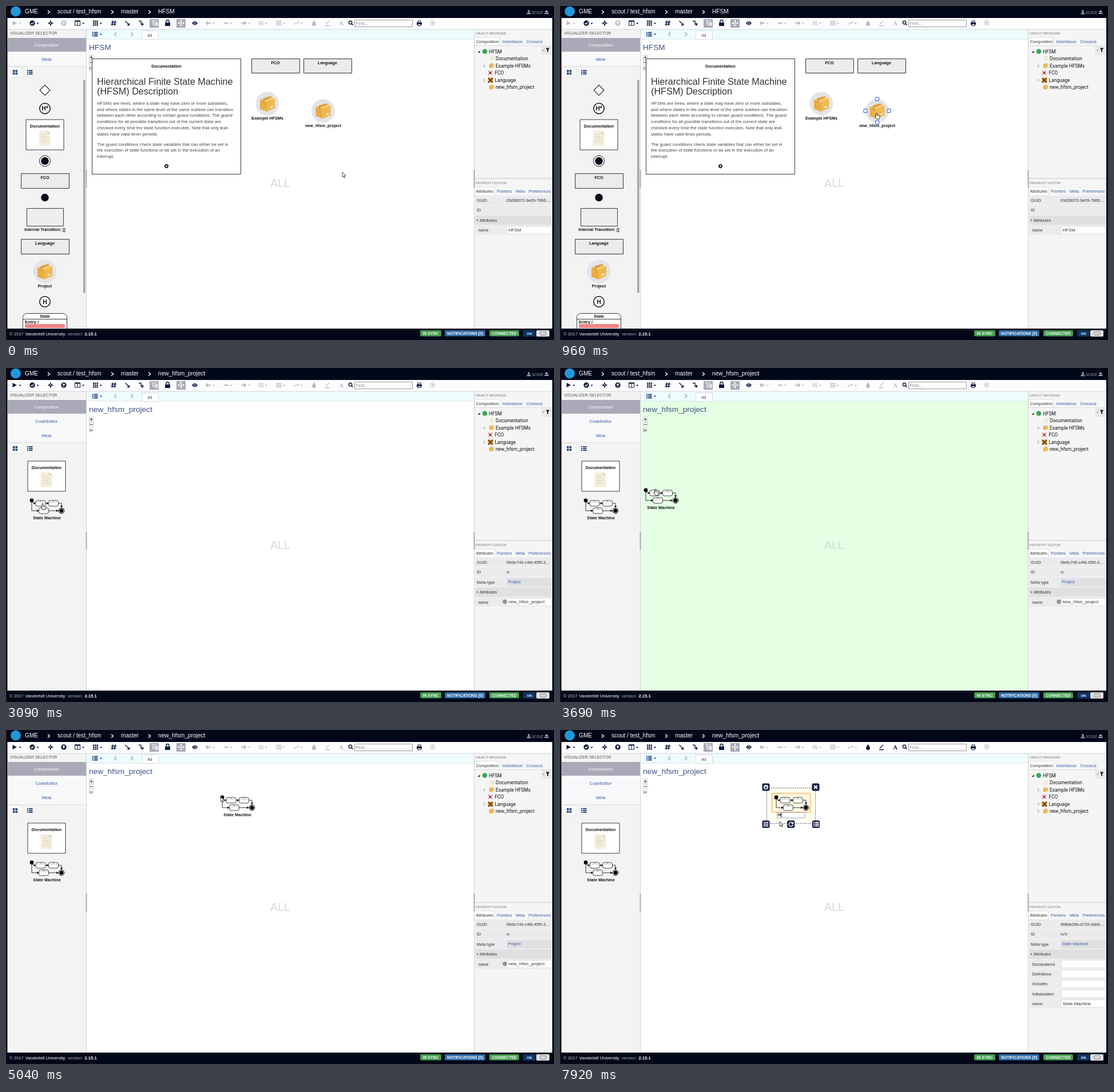
These frames come from a looping animation (958 by 585 pixels, 8000 ms). An HTML page with a canvas:

```html
<!DOCTYPE html>
<html lang="en">
<head>
<meta charset="utf-8">
<title>Model editor</title>
<style>
html, body { margin: 0; width: 100%; height: 100%; overflow: hidden; background: #fff; }
canvas { display: block; }
</style>
</head>
<body>
<canvas id="stage" width="958" height="585"></canvas>
<script>
const g = document.getElementById('stage').getContext('2d');
const LOOP = 8000;
const OPEN = 1500, HEADER = 2460, DRAG = 3350, DROP = 4900, SELECT = 5520, EDIT = 5600,
      CARET = 6600, MARK = 6990, TYPED = 7830;
const NAVY = '#0c1a3c', BLUE = '#3a5ca0', DARK = '#020818', GREY = '#b9bcc2', INK = '#333', EDGE = '#3a3a3a';
const FONT = '"Liberation Sans", Arial, sans-serif';
const TREE_FONT = 'Roboto, "Liberation Sans", sans-serif';

// ---- drawing helpers ----
function text(s, x, y, size = 7.2, color = INK, style = '', align = 'left', font = FONT) {
  g.font = `${style} ${size}px ${font}`;
  g.fillStyle = color;
  g.textAlign = align;
  g.fillText(s, x, y);
  return g.measureText(s).width;
}
const label = (s, x, y, size = 7.2) => text(s, x, y, size, '#111', 'bold', 'center');

function paint(path, fill, stroke, width = 1) {
  if (fill) { g.fillStyle = fill; g.fill(path); }
  if (stroke) { g.strokeStyle = stroke; g.lineWidth = width; g.stroke(path); }
}
function rect(x, y, w, h, fill, stroke, radius = 0, width = 1) {
  const p = new Path2D();
  p.roundRect(x, y, w, h, radius);
  paint(p, fill, stroke, width);
}
function disc(x, y, r, fill, stroke, width) {
  const p = new Path2D();
  p.arc(x, y, r, 0, 7);
  paint(p, fill, stroke, width);
}
function shape(d, x, y, fill, stroke, width) {
  g.save();
  g.translate(x, y);
  paint(new Path2D(d), fill, stroke, width);
  g.restore();
}
const caretDown = (x, y, c) => shape('M-2.2-1h4.4L0 1.6z', x, y, c);

function gridIcon(x, y, n, cell, step, color) {
  const o = ((n - 1) * step + cell) / 2;
  for (let i = 0; i < n * n; i++)
    rect(x - o + i % n * step, y - o + (i / n | 0) * step, cell, cell, color);
}
function listIcon(x, y, color) {
  for (let i = -1; i < 2; i++) {
    rect(x - 4.5, y + i * 3 - 1, 2, 2, color);
    rect(x - 1.5, y + i * 3 - 1, 6.5, 2, color);
  }
}

// ---- model parts ----
function classBox(name, x, y, w, h) {
  rect(x + .5, y + .5, w, h, '#ececee', EDGE);
  rect(x + 2, y + 2, w - 3, h - 3, null, '#dcdce0');
  label(name, x + w / 2, y + 10);
}
function page(x, y, k = 1) {
  g.save();
  g.translate(x, y);
  g.scale(k, k);
  shape('M-10-13H5L10-8V13H-10z', 0, 0, '#f3eddc');
  shape('M5-13V-8H10z', 0, 0, '#d6ccb2');
  shape('M-6-6H2M-6-2H6M-6 2H4M-6 6H6', 0, 0, null, '#d5cbb0', .8);
  g.restore();
}
function docCard(x, y) {
  rect(x + .5, y + .5, 66, 53, '#fff', EDGE);
  label('Documentation', x + 33.5, y + 14.5);
  page(x + 33, y + 33);
}
function parcel(x, y, k = 1) {
  g.save();
  g.translate(x, y);
  g.scale(k, k);
  shape('M-13-7 2-13 13-9-1-3z', 0, 0, '#f3c974');
  shape('M-13-7-1-3V14L-13 9z', 0, 0, '#e9ad42');
  shape('M-1-3 13-9V8L-1 14z', 0, 0, '#efb950');
  shape('M-7.5-9 6-13 8-11.5-5-6V-2L-7.5-3z', 0, 0, '#d9983a');
  shape('M5 8 10 6V3.5L5 5.5z', 0, 0, '#fbeccb');
  g.restore();
}
function project(name, x, y) {
  disc(x, y, 20.5, '#e2e4e9');
  parcel(x, y);
  label(name, x, y + 28);
}
function stateMachine(x, y, name) {
  shape('M0 0V18H12M0 0 3 5H6M24 5H29M47 5H52V12M30 18H46', x, y, null, '#222', .9);
  shape('M9 16 13 18 9 20zM4 3 7 5 4 7zM26 3 30 5 26 7zM50 9 52 13 54 9zM43 16 47 18 43 20z', x, y, '#111');
  for (const [dx, dy] of [[15.5, 5], [38, 5], [21, 18]]) {
    rect(x + dx - 8.5, y + dy - 5, 17, 10, '#fff', '#333', 3, .9);
    shape('M-7-2H7', x + dx, y + dy, null, '#999', .6);
    rect(x + dx - 1, y + dy - 4.5, 2, 1, '#555');
  }
  disc(x, y, 3.4, '#000');
  disc(x + 52, y + 18, 4.8, '#fff', '#000', 1);
  disc(x + 52, y + 18, 3.4, '#000');
  if (name) label(name, x + 26.5, y + 33);
}

// ---- fixed frame of the application ----
function topBar(t) {
  rect(0, 0, 958, 21, DARK);
  disc(17, 9.5, 9, '#2196d8');
  const crumbs = [['GME', 33], ['scout / test_hfsm', 90], ['master', 201],
    [t < HEADER ? 'HFSM' : 'new_hfsm_project', 266]];
  for (const [s, x] of crumbs) text(s, x, 13.3, 10.15, '#fff');
  for (const x of [75, 186, 251]) shape('M-2-3 1.5 0-2 3', x, 10.5, null, '#fff', 1.4);
  disc(914, 9, 2, '#8b8f98');
  shape('M-3.5 5.5V4Q-3 2 0 2T3.5 4V5.5z', 914, 9, '#8b8f98');
  text('scout', 919, 13.8, 8.2, '#8b8f98');
  shape('M-3.5 1 0-3 3.5 1zM-3.5 2H3.5V4H-3.5z', 945, 10, '#aab');
}

function toolbar(t) {
  const y = 30, on = t < OPEN ? GREY : NAVY, style = t < SELECT ? GREY : NAVY;
  rect(3, 21, 952, 20, '#fdfdfe');
  shape('M-3.5-4 4 0-3.5 4z', 15, y, on);
  disc(46, y, 4.7, NAVY);
  shape('M-2.3 0-.6 1.8 2.5-1.6', 46, y, null, '#fff', 1.4);
  shape('M0-5.5 1.5-1.5 5.5 0 1.5 1.5 0 5.5-1.5 1.5-5.5 0-1.5-1.5z', 78, y, NAVY);
  disc(78, y, 1, '#fff');
  disc(101, y, 4.7, on);
  shape('M0 3V-2M-2 0 0-2.4 2 0', 101, y, null, '#fff', 1.3);
  rect(120.5, 26, 9, 8, '#fff', NAVY);
  rect(120, 25.5, 10, 2, NAVY);
  rect(124.5, 26, 1, 8, NAVY);
  gridIcon(156.5, y, 3, 2.4, 3.3, NAVY);
  shape('M-1-4.5-2.5 4.5M3-4.5 1.5 4.5M-4-1.7H5M-4.6 1.7H4.4', 188, y, null, NAVY, 1.5);
  shape('M-3.5-4 3 3M3.5 0V3.5H0', 212, y, null, NAVY, 1.3);
  shape('M-4-3.5H0V2H3M1.5-.5 4 2 1.5 4.5', 236, y, null, NAVY, 1.3);
  rect(251, 23, 16, 15, '#a9a9b7');
  shape('M-5-4H5M-2-4V3H3M-2 0H3M3-1.5H6V1H3zM3 2H6V4.5H3z', 259, y, null, '#fff', 1.1);
  rect(278, 29, 9, 6, NAVY, null, 1);
  shape('M-2.5 0V-2A2.5 2.5 0 0 1 2.5-2V0', 282.5, 29, null, NAVY, 1.4);
  rect(298, 23, 16, 15, '#a9a9b7');
  shape('M-5 0H5M0-5V5M-1.5-3.5 0-5 1.5-3.5M-1.5 3.5 0 5 1.5 3.5M-3.5-1.5-5 0-3.5 1.5M3.5-1.5 5 0 3.5 1.5', 306, y, null, '#fff', 1.2);
  shape('M-5 0Q0-7 5 0Q0 7-5 0z', 330, y, NAVY);
  disc(330, y, 2, NAVY, '#fff', .8);
  shape('M4 0H-4M-1-3-4 0-1 3', 354, y, null, GREY, 2);
  rect(381, 29, 8, 2, GREY);
  shape('M-4 0H4M1-3 4 0 1 3', 415, y, null, GREY, 2);
  shape('M-3-4V4M0-4V4M3-4V4M-4.3 1H-1.7M-1.3-2H1.3M1.7 2H4.3', 446, y, null, GREY, 1);
  shape('M-5-3H5M-5 0H5M-5 3H5', 477, y, null, GREY, 1.5);
  shape('M-4 3Q-3-1 0 0T4-3', 508, y, null, GREY, 1.3);
  shape('M0-5Q3.5 0 3.5 1.5A3.5 3.5 0 0 1-3.5 1.5Q-3.5 0 0-5z', 538.5, y, style);
  shape('M-3 2 3-4M-4 4.5H4', 562, y, null, style, 1.3);
  text('A', 586, 34, 11, style, 'bold', 'center', '"Liberation Serif", Times, serif');
  for (const [x, c] of [[24.5, on], [55.5, NAVY], [135, NAVY], [166, NAVY], [363, GREY], [394, GREY],
    [425, GREY], [455, GREY], [486, GREY], [517, GREY]]) caretDown(x, y + .5, c);
  disc(602, 29, 2.7, null, NAVY, 1.4);
  shape('M2 2 4.5 4.5', 602, 29, null, NAVY, 1.6);
  rect(609.5, 24.5, 101, 12, '#fff', '#999');
  text('Find...', 611, 33, 8, '#888');
  rect(718, 28.5, 9, 4.5, NAVY, null, 1);
  rect(720, 26, 5, 3, '#fff', NAVY);
  rect(720, 31.5, 5, 3, '#fff', NAVY);
  disc(746, 29.5, 4, null, GREY, 1);
  shape('M-1.7-1.7 1.7 1.7M1.7-1.7-1.7 1.7', 746, 29.5, null, GREY, 1.2);
}

function footer() {
  rect(0, 565, 958, 20, DARK);
  text('© 2017', 6, 577, 7.6, '#c4c7ce');
  text('Vanderbilt University', 33.5, 577, 7.7, '#fff');
  text('version:', 108, 577, 7.5, '#a8acb6');
  text('2.15.1', 137.5, 577, 7.6, '#fff', 'bold');
  for (const [s, x, w, c] of [['IN SYNC', 724, 37, '#449d50'], ['NOTIFICATIONS [0]', 767, 71, '#2d6ca8'],
    ['CONNECTED', 845, 52, '#449d50']]) {
    rect(x, 568, w, 10.5, c, null, 2);
    text(s, x + w / 2, 575.6, 6.85, '#fff', 'bold', 'center');
  }
  rect(904, 568, 22, 11, '#0d3564', null, 2);
  text('ON', 915, 576, 6, '#fff', 'bold', 'center');
  rect(927, 568, 23, 11, '#dfe1e5', null, 2);
  rect(934, 570.5, 10, 6, '#fff', '#777', 1);
  shape('M-4-1H4M-4 1H4', 939, 573.5, null, '#999', .8);
}

function sidebar(t) {
  rect(3, 41, 137, 524, '#f3f3f4');
  text('VISUALIZER SELECTOR', 7, 50, 7.2, '#555');
  rect(3, 56, 137, 24, '#a9a9b7');
  text('Composition', 71, 70.7, 7.75, '#fff', '', 'center');
  const rows = t < OPEN ? ['Meta'] : ['CodeEditor', 'Meta'];
  const y = 91 + rows.length * 25;
  rect(3, 80, 137, y - 91, '#f8f8fa');
  rows.forEach((s, i) => text(s, 71, 96 + i * 25, 7.75, BLUE, '', 'center'));
  rect(3, y - 11, 137, 1, '#e2e2e6');
  rect(3, y - 9, 25, 18, '#fafafa', '#e4e4e8');
  gridIcon(16, y, 2, 3.6, 4.6, '#24457f');
  listIcon(41.5, y, '#24457f');

  if (t >= OPEN) {
    docCard(37.5, 162.5);
    stateMachine(45, 232, 'State Machine');
    return;
  }
  g.save();
  g.beginPath();
  g.rect(3, 41, 137, 524);
  g.clip();
  shape('M0-9 9 0 0 9-9 0z', 68, 147.5, '#fff', '#222', 1.1);
  for (const [s, cy] of [['H*', 179.5], ['H', 518]]) {
    disc(68, cy, 9.2, '#fff', '#111', 1.5);
    label(s, 68, cy + 3.8, 10.5);
  }
  docCard(34.5, 198.5);
  disc(68, 271.5, 9.5, '#fff', '#111', 1);
  disc(68, 271.5, 6.8, DARK);
  classBox('FCO', 26, 293, 84, 26);
  disc(68, 335.5, 6.7, DARK);
  rect(36.5, 354.5, 64, 31, '#eee', EDGE);
  label('Internal Transition: []', 68, 394);
  classBox('Language', 26, 408, 84, 26);
  project('Project', 68, 465);
  rect(29.5, 538.5, 77, 40, '#fff', EDGE, 7);
  label('State', 68, 546);
  rect(30, 548, 77, 1, EDGE);
  text('Entry /', 33, 556, 7.8, '#111', 'bold');
  rect(33, 557, 70, 7, '#f28585', null, 2.5);
  g.restore();
  rect(135, 129, 3.5, 374, '#a6a6aa', null, 2);
}

function browser(t) {
  rect(819, 41, 136, 524, '#f5f5f6');
  text('OBJECT BROWSER', 821, 49.5, 5.7, '#777');
  rect(819, 55, 44, 14, '#fff', '#ddd');
  rect(819, 69, 136, 1, '#ddd');
  text('Composition', 821.5, 64.7);
  text('Inheritance', 867.5, 64.7, 7.2, BLUE);
  text('Crosscut', 909.5, 64.7, 7.2, BLUE);
  rect(936.5, 71.5, 20, 13, '#ececef', '#ddd');
  shape('M1-2-1 0 1 2', 940, 77.5, null, '#555', .9);
  shape('M-3.5-3.5H3.5L1 0V4L-1 3V0z', 947, 77, '#222');

  shape('M2-2V2H-2z', 826.5, 80, '#333');
  disc(837, 79.5, 4.3, '#36a852');
  page(849.5, 92, .33);
  parcel(849, 104.5, .32);
  parcel(849, 142, .32);
  rect(842.5, 113, 8, 8, '#f8e2e2');
  shape('M-3.5-3.5 3.5 3.5M3.5-3.5-3.5 3.5', 846.5, 117, null, '#d4727c', 1.1);
  disc(846.5, 117, 1.8, '#9c2030');
  rect(842.5, 125.5, 9, 9, '#e2a03c');
  shape('M-4-4 4 4M4-4-4 4', 847, 130, null, '#3a2a18', 1.5);
  const open = t < SELECT ? [105, 130] : [105, 130, 142.5];
  for (const y of open) shape('M-1.5-2.5 1.5 0-1.5 2.5z', 837, y, '#fff', '#aaa', .8);
  [['HFSM', 844], ['Documentation', 856], ['Example HFSMs', 856], ['FCO', 854.5], ['Language', 854.5],
    ['new_hfsm_project', 856]].forEach(([s, x], i) =>
    text(s, x, 82.9 + i * 12.5, 8.35, '#111', '', 'left', TREE_FONT));
}

function properties(t) {
  rect(819, 301, 136, 2, '#ddd');
  text('PROPERTY EDITOR', 821, 312, 5.7, '#777');
  rect(819, 317, 35, 15, '#fff', '#ddd');
  rect(819, 332, 136, 1, '#ddd');
  [['Attributes', 821.5], ['Pointers', 858], ['Meta', 891], ['Preferences', 913.5]]
    .forEach(([s, x], i) => text(s, x, 326.7, 7.2, i ? BLUE : INK));

  const sel = t >= SELECT, node = t >= OPEN;
  const head = [['GUID', sel ? '968de39b-d720-0ab6-...' : node ? '0fe6c740-c4fd-45f0-3...' : '03d36072-9e09-7866-...'],
    ['ID', sel ? '/v/V' : node ? '/v' : '']];
  if (node) head.push(['Meta type', sel ? 'State Machine' : 'Project']);
  const attrs = sel ? ['Declarations', 'Definitions', 'Includes', 'Initialization', 'name'] : ['name'];
  let y = 332;
  for (const [k, v] of head) {
    const link = k === 'Meta type';
    rect(820, y, 134, 16.3, '#ebebed');
    if (link) rect(875.5, y + 1, 78.5, 15, '#e0e0e3');
    text(k, 823, y + 11);
    text(v, link ? 877.5 : 875, y + (link ? 10.5 : 11), 7.2, link ? BLUE : INK);
    y += 17.35;
  }
  rect(820, y, 134, 16.8, '#e0e0e2');
  shape('M-1.7-.8H1.7L0 1.2z', 824, y + 8.5, INK);
  text('Attributes', 828, y + 11);
  for (const k of attrs) {
    y += 17.35;
    rect(820, y, 134, 16.5, '#ebebed');
    rect(876.5, y + 2, 77, 13, '#fff', '#e4e4e6');
    text(k, 825.5, y + 11.2);
    if (k !== 'name') continue;
    text(sel ? 'State Machine' : node ? 'new_hfsm_project' : 'HFSM', 878.5, y + 10.8, 7.75);
    if (node && !sel) {
      disc(872, y + 8, 3, null, '#222', .9);
      shape('M-1.3-1.3 1.3 1.3M1.3-1.3-1.3 1.3', 872, y + 8, null, '#222', 1);
    }
  }
}

// ---- canvas in the middle ----
function description() {
  rect(150.5, 92.5, 260, 202, '#fff', EDGE);
  label('Documentation', 280.5, 108);
  text('Hierarchical Finite State Machine', 159, 137.5, 16.2);
  text('(HFSM) Description', 159, 155, 16.2);
  const lines = ['HFSMs are trees, where a state may have zero or more substates,',
    'and where states in the same level of the same subtree can transition',
    'between each other according to certain *guard conditions*. The *guard',
    '*conditions* for all possible transitions out of the current state are',
    'checked every time the state function executes. Note that only leaf-',
    'states have valid timer periods.',
    'The guard conditions check state variables that can either be set in',
    'the execution of state functions or be set in the execution of an',
    'interrupt.'];
  lines.forEach((line, i) => {
    let x = 159;
    line.split('*').forEach((s, j) => {
      x += text(s, x, 172.8 + i * 10.8 + (i > 5 ? 7 : 0), 7.75, '#444', j % 2 ? 'italic' : '');
    });
  });
  disc(280.5, 280.5, 2.2, null, '#111', 1.5);
  for (let a = 0; a < 8; a++) {
    const c = Math.cos(a * Math.PI / 4), s = Math.sin(a * Math.PI / 4);
    shape(`M${2.2 * c} ${2.2 * s}L${3.9 * c} ${3.9 * s}`, 280.5, 280.5, null, '#111', 1.3);
  }
}

function selection() {
  rect(361.5, 101.5, 85, 62, '#fffff0');
  g.setLineDash([2, 1.5]);
  rect(361.5, 101.5, 85, 62, null, '#667');
  g.setLineDash([]);
  rect(370.5, 111, 67, 33, '#fff9e6', '#fbe3b5', 2, 3);
  rect(370.5, 111, 67, 33, null, '#f3c57c', 2, 1);
  const icons = [[360, 100], [447, 100], [360, 165], [403.7, 165], [447.5, 165]];
  for (const [x, y] of icons) rect(x - 6.5, y - 6.5, 13, 13, NAVY, null, 2.5);
  disc(360, 100, 4, '#fff');
  shape('M0-2.5V2M-2 0 0 2.3 2 0', 360, 100, null, NAVY, 1.2);
  shape('M-3-3 3 3M3-3-3 3', 447, 100, null, '#fff', 2);
  gridIcon(360, 165, 3, 2.2, 3, '#fff');
  shape('M3-2A3.6 3.6 0 1 0 3.6 1M3.8-4V-1H.8', 403.7, 165, null, '#fff', 1.4);
  listIcon(447.5, 165, '#fff');
}

function nameField(t) {
  const marked = t >= MARK && t < TYPED;
  rect(379.5, 144.5, 48.5, 9.5, '#fff', '#9aa4c4');
  g.save();
  g.beginPath();
  g.rect(380, 145, 47.5, 9);
  g.clip();
  if (marked) rect(381, 145.5, 47, 8, '#3390ff');
  text(t < TYPED ? 'State Machine' : 'H', 381, 151.3, 7.2, marked ? '#fff' : '#111', 'bold');
  if (t >= CARET && t < MARK) rect(381, 145, 1, 8, '#111');
  if (t >= TYPED) rect(386.3, 145, 1, 8, '#111');
  g.restore();
}

function workspace(t) {
  const dragging = t >= DRAG && t < DROP;
  rect(141, 41, 677, 524, dragging ? '#e4ffe4' : '#fff');
  rect(141, 41, 677, 17, '#effcfd');
  rect(141, 57.5, 677, 1, '#dce6ea');
  listIcon(155.5, 49.5, '#24457f');
  caretDown(166, 49.5, '#24457f');
  shape('M2-3.5-1.5 0 2 3.5', 191, 49.5, null, '#a9bdd8', 1.8);
  shape('M-2-3.5 1.5 0-2 3.5', 220.5, 49.5, null, '#a9bdd8', 1.8);
  rect(237.5, 43.5, 29, 15, '#fff', '#d4dce0');
  text('All', 247.3, 53.7, 7.4, '#444');

  text(t < OPEN ? 'HFSM' : 'new_hfsm_project', 145, 76.7, 13.65, '#3b5080');
  text('ALL', 462, 317, 19.6, '#d8d8da');
  for (const y of [90, 99]) {
    rect(145.5, y - 4, 7.5, 8, '#fff', '#ccc');
    shape(y < 95 ? 'M-2.5 0H2.5M0-2.5V2.5' : 'M-2.5 0H2.5', 149.2, y, null, '#223', 1);
  }
  text('1x', 145, 110.7, 6.8, '#222');

  if (t < OPEN) {
    description();
    classBox('FCO', 429, 92, 84, 25);
    classBox('Language', 520, 92, 84, 25);
    project('Example HFSMs', 457, 171);
    project('new_hfsm_project', 554.5, 183.5);
    if (t >= 690)
      for (const [x, y] of [[554.5, 163], [534, 183.5], [575, 183.5], [554.5, 204]])
        rect(x - 3, y - 3, 6, 6, '#fff', '#3355c8');
  }
  if (t >= SELECT) selection();
  if (t >= DROP) stateMachine(378, 118, t < EDIT ? 'State Machine' : '');
  if (t >= EDIT) nameField(t);
}

// ---- motion ----
// Each key is [time, x, y]; positions ease between neighbours.
function along(keys, t) {
  let i = 0;
  while (i < keys.length - 2 && t > keys[i + 1][0]) i++;
  const [a, b] = [keys[i], keys[i + 1]];
  let k = Math.min(1, Math.max(0, (t - a[0]) / (b[0] - a[0])));
  k = k * k * (3 - 2 * k);
  return [a[1] + (b[1] - a[1]) * k, a[2] + (b[2] - a[2]) * k];
}
const pointer = [[120, 588, 291], [800, 553.5, 187], [1450, 553.5, 187], [1700, 551, 184], [2150, 551, 184],
  [3050, 64, 237], [DRAG, 64, 237], [3690, 167, 212], [4550, 373.5, 111], [4950, 373.5, 111],
  [5300, 384, 147], [5620, 384, 147], [5850, 384, 160]];
const ghost = [[DRAG, 45, 232], [3690, 150, 214], [4550, 370, 110]];

function cursor(t) {
  const [x, y] = along(pointer, t);
  const hand = t >= 690 && t < OPEN || t >= 2950 && t < DROP || t >= 5050 && t < 5700;
  if (hand)
    shape('M-1 1Q0-1 1 1V4.5L5 5.5Q6 6 5.5 8L4.5 11H0L-3 7Q-3 5.5-1 6.5z', x, y, '#fff', '#222', .9);
  else
    shape('M0 0V8.5L2 6.8 3.4 10 4.8 9.4 3.4 6.3H6z', x, y, '#fff', '#222', .8);
}

function draw(t) {
  rect(0, 0, 958, 585, '#fff');
  workspace(t);
  sidebar(t);
  browser(t);
  properties(t);
  for (const x of [140, 818]) {
    rect(x, 41, 1, 524, '#d2d2d6');
    rect(x - .5, 287, 2, 31, '#aaaab0');
  }
  toolbar(t);
  rect(3, 40.5, 952, 1, '#cfd3d8');
  topBar(t);
  footer();
  rect(0, 0, 2.5, 585, '#160d18');
  rect(955, 0, 3, 585, DARK);
  if (t >= DRAG && t < DROP) stateMachine(...along(ghost, t), 'State Machine');
  cursor(t);
}

const start = performance.now();
function tick() {
  draw((performance.now() - start) % LOOP);
  requestAnimationFrame(tick);
}
tick();
</script>
</body>
</html>
```
